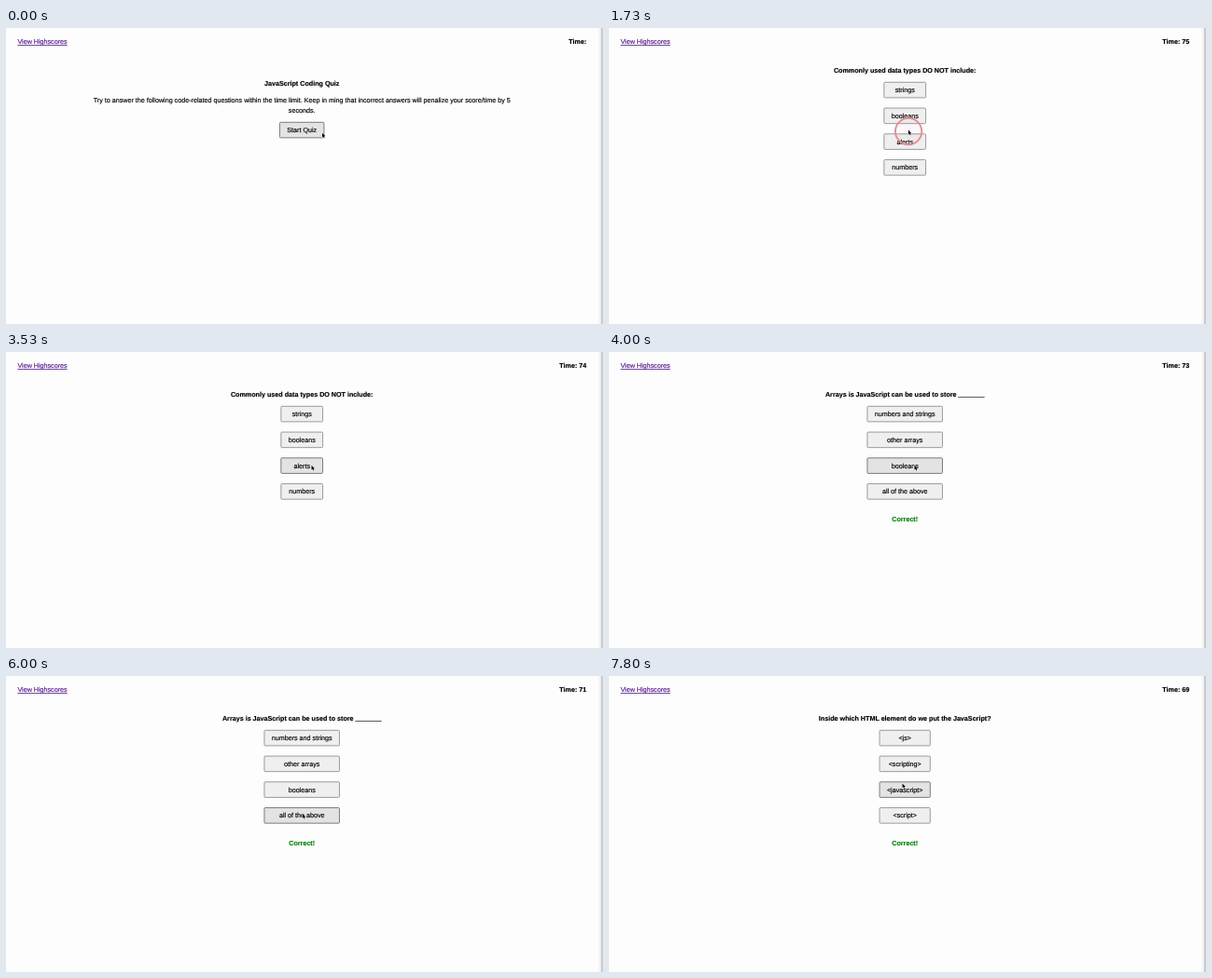
An HTML page with a canvas for the animation above (8000 ms loop, 640x318 px).

```html
<!DOCTYPE html>
<html lang="en">
<head>
<meta charset="utf-8">
<title>JavaScript Coding Quiz</title>
<style>
  html, body { margin: 0; width: 100%; height: 100%; overflow: hidden; background: #fdfdfd; }
  canvas { display: block; width: 640px; height: 318px; }
</style>
</head>
<body>
<canvas id="stage" width="640" height="318"></canvas>
<script>
const ctx = document.getElementById('stage').getContext('2d');
const LOOP = 8000;
const SCALE = 0.448; // 16px page text shown at reduced size
const CENTER = 317.2;
const RING_MS = 260;
const PAGE_DELAY = 130;

// Each page opens PAGE_DELAY after the press at `click`.
const pages = [
  { click: -LOOP },
  { click: 1600, title: 'Commonly used data types DO NOT include:',
    answers: ['strings', 'booleans', 'alerts', 'numbers'] },
  { click: 3540, title: 'Arrays is JavaScript can be used to store _______', correct: true,
    answers: ['numbers and strings', 'other arrays', 'booleans', 'all of the above'] },
  { click: 6070, title: 'String values must be enclosed within ______ when being assigned to variables', correct: true,
    answers: ['commas', 'curly brackets', 'quotes', 'parentheses'] },
  { click: 6935, title: 'Inside which HTML element do we put the JavaScript?', correct: true,
    answers: ['<js>', '<scripting>', '<javascript>', '<script>'] }
];

// The pointer rests between these eased moves.
const home = { x: 339, y: 112.7 };
const moves = [
  { from: 60, to: 460, x: 336, y: 112.5 },
  { from: 600, to: 1300, x: 330.9, y: 110.2 },
  { from: 1350, to: 1460, x: 320.9, y: 109.6 },
  { from: 2260, to: 2600, x: 325.7, y: 108.3 },
  { from: 3200, to: 3520, x: 327.5, y: 121.8 },
  { from: 4660, to: 5400, x: 320.4, y: 128.3 },
  { from: 5530, to: 6000, x: 318, y: 148 },
  { from: 6400, to: 6880, x: 315.5, y: 123.4 },
  { from: 7260, to: 7700, x: 314.5, y: 115.5 }
];

const clamp = u => Math.min(1, Math.max(0, u));
const ease = u => u * u * (3 - 2 * u);

function pointerAt(t) {
  return moves.reduce((p, m) => {
    const k = ease(clamp((t - m.from) / (m.to - m.from)));
    return { x: p.x + (m.x - p.x) * k, y: p.y + (m.y - p.y) * k };
  }, home);
}

function setFont(bold) {
  ctx.font = (bold ? 'bold ' : '') + '16px "Liberation Sans", Arial, sans-serif';
  ctx.textRendering = 'geometricPrecision';
}

function measure(str) {
  setFont(false);
  return ctx.measureText(str).width * SCALE;
}

function text(str, x, y, { bold = false, align = 'center', color = '#000' } = {}) {
  ctx.save();
  ctx.translate(x, y);
  ctx.scale(SCALE, SCALE);
  setFont(bold);
  ctx.textAlign = align;
  ctx.fillStyle = ctx.strokeStyle = color;
  ctx.lineWidth = 0.35;
  ctx.lineJoin = 'round';
  ctx.fillText(str, 0, 0);
  ctx.strokeText(str, 0, 0);
  ctx.restore();
}

function button(label, y, labelWidth, pointer, pressed) {
  const w = labelWidth + 16.4;
  const h = 17.4;
  const x = CENTER - w / 2;
  const over = pointer.x >= x && pointer.x <= x + w && pointer.y >= y && pointer.y <= y + h;
  const [fill, stroke] = !over ? ['#efefef', '#858585']
    : pressed ? ['#f5f5f5', '#999'] : ['#e3e3e3', '#606060'];
  ctx.beginPath();
  ctx.roundRect(x + 0.4, y + 0.4, w - 0.8, h - 0.8, 1);
  ctx.fillStyle = fill;
  ctx.fill();
  ctx.lineWidth = 0.8;
  ctx.strokeStyle = stroke;
  ctx.stroke();
  text(label, CENTER, y + 11.1);
}

function header(t) {
  const link = 'View Highscores';
  const purple = '#551a8b';
  const baseline = 17.1;
  text(link, 12.4, baseline, { align: 'left', color: purple });
  ctx.fillStyle = purple;
  ctx.fillRect(12.4, baseline + 0.9, measure(link), 0.8);
  const seconds = Math.floor((t - pages[1].click - PAGE_DELAY) / 1000);
  const label = seconds < 0 ? 'Time:' : 'Time: ' + (75 - seconds);
  text(label, 622.3, baseline, { bold: true, align: 'right' });
}

function intro(pointer, pressed) {
  text('JavaScript Coding Quiz', CENTER, 62.2, { bold: true });
  text('Try to answer the following code-related questions within the time limit. ' +
    'Keep in ming that incorrect answers will penalize your score/time by 5', CENTER, 80.1);
  text('seconds.', CENTER, 90.9);
  button('Start Quiz', 100.9, measure('Start Quiz'), pointer, pressed);
}

function question(page, pointer, pressed) {
  text(page.title, CENTER, 47.7, { bold: true });
  const width = Math.max(...page.answers.map(measure));
  page.answers.forEach((label, i) => button(label, 57.9 + i * 27.75, width, pointer, pressed));
  if (page.correct) text('Correct!', CENTER, 182.3, { bold: true, color: '#008000' });
}

function windowEdge() {
  const shade = ctx.createLinearGradient(635, 0, 639, 0);
  shade.addColorStop(0, '#fdfdfd');
  shade.addColorStop(1, '#e2e2e2');
  ctx.fillStyle = shade;
  ctx.fillRect(635, 0, 5, 318);
  ctx.fillStyle = '#b4b4b4';
  ctx.fillRect(638.4, 0, 1, 318);
}

function ring({ x, y }, age) {
  ctx.save();
  ctx.globalAlpha = clamp((RING_MS - age) / (RING_MS - PAGE_DELAY));
  ctx.beginPath();
  ctx.arc(x + 0.2, y + 1.5, 14.2, 0, Math.PI * 2);
  ctx.fillStyle = 'rgba(225, 120, 130, 0.05)';
  ctx.fill();
  ctx.lineWidth = 1.9;
  ctx.strokeStyle = '#e28d94';
  ctx.stroke();
  ctx.restore();
}

function arrow({ x, y }) {
  ctx.save();
  ctx.translate(x, y);
  ctx.scale(0.86, 0.86);
  ctx.stroke(arrowShape);
  ctx.fill(arrowShape);
  ctx.restore();
}
const arrowShape = new Path2D('M0 0V5.6L1.3 4.5L2.2 6.5L3.1 6.1L2.3 4.2L4 4.1Z');

function draw(t) {
  const pointer = pointerAt(t);
  const press = pages.find(p => t >= p.click && t < p.click + RING_MS);
  const age = press ? t - press.click : Infinity;
  const pressed = age < PAGE_DELAY;
  const page = pages.findLast(p => t >= p.click + PAGE_DELAY);

  ctx.fillStyle = '#fdfdfd';
  ctx.fillRect(0, 0, 640, 318);
  windowEdge();
  header(t);
  if (page.title) question(page, pointer, pressed);
  else intro(pointer, pressed);
  if (press) ring(pointer, age);

  ctx.lineWidth = 0.8;
  ctx.lineJoin = 'round';
  ctx.strokeStyle = '#fff';
  ctx.fillStyle = '#000';
  arrow(pointer);
}

const began = performance.now();
function tick() {
  draw((performance.now() - began) % LOOP);
  requestAnimationFrame(tick);
}
tick();
</script>
</body>
</html>
```
